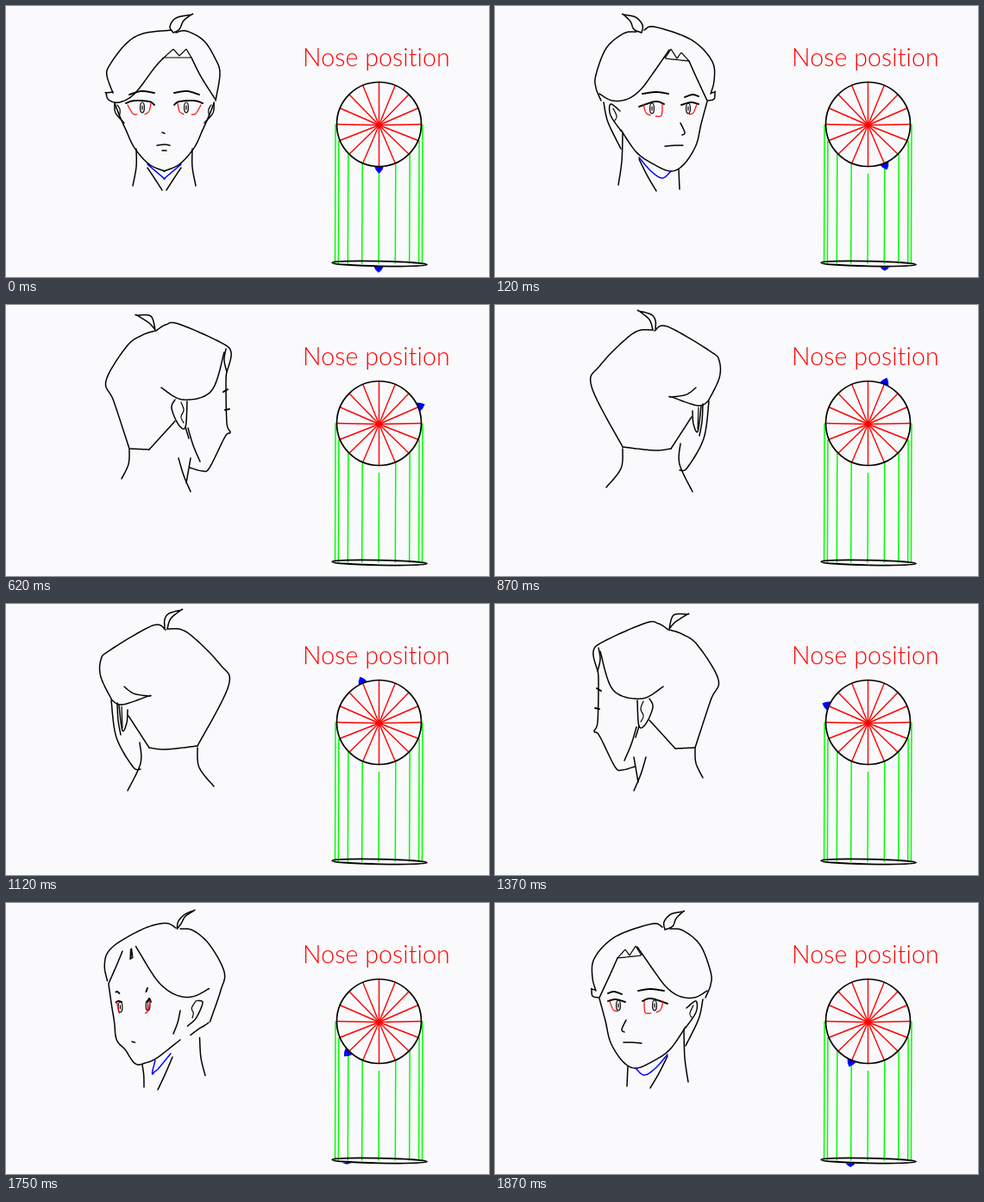
An HTML page with a canvas for the animation above (2000 ms loop, 560 px wide and 315 px high).

```html
<!DOCTYPE html>
<html lang="en">
<head>
<meta charset="utf-8">
<title>Nose position</title>
<style>
  html, body { margin: 0; overflow: hidden; background: #fafafc; }
  canvas { display: block; width: 560px; height: 315px; }
</style>
</head>
<body>
<canvas id="stage" width="560" height="315"></canvas>
<script>
const ctx = document.getElementById('stage').getContext('2d');
const STEPS = 16, SAMPLES = 49, TURN = 2 * Math.PI;

// Key points of each pen stroke; a repeated point makes a corner.
const frontHalf = {
  face: '126,113 131,126 139,144 149,165 166,184 184,192',
  ear: '126,112 127,124 137,136', earIn: '129,115 132,120 132,126',
  neck: '151,166 151,187 147,209', collar: '164,188 172,200 181,214',
  blueNeck: '164,184 184,201',
  brow: '143,103 157,99 172,101', lid: '139,113 149,110 166,111 172,115',
  iris: '158,118', redIn: '168,113 166,122 161,126', redOut: '141,115 147,125 152,126'
};
const frontHair = {
  tuft: '194,31 190,24 197,14 215,10 215,10 206,17 201,27 194,31',
  hairLeft: '192,28 159,32 139,44 120,69 117,81 124,101',
  hairRight: '197,31 209,29 229,40 242,60 248,78 243,110',
  bangLeft: '124,100 116,101 116,101 119,109 131,112 149,102 172,72 182,61',
  bangRight: '215,60 226,82 243,109',
  zig: '182,61 194,50 201,58 209,50 215,60 182,60',
  nose: '181,147 184,148', mouth: '175,162 184,161 190,162', lip: '181,168 186,168'
};
const quarter = {
  tuft: '197,31 196,22 204,13 218,10 218,10 210,18 206,27 197,31',
  hairFront: '194,28 183,24 148,35 128,48 114,67 113,87 117,102',
  curl: '116,101 112,100 112,100 113,108 120,110',
  hairBack: '203,30 218,32 238,49 250,80 250,95 244,110',
  bangFar: '142,64 134,82 121,110',
  zig: '142,64 151,54 156,61 163,50 170,61 142,64',
  bangNear: '165,51 183,77 198,97 213,108 231,110 246,102',
  ear: '222,122 233,114 233,127 221,145', earIn: '230,119 226,128 228,133',
  nape: '241,112 236,135 221,166', neckBack: '219,147 220,180 224,208',
  face: '121,111 128,137 134,162 148,184 163,192 183,184 203,170 221,144',
  neckFar: '154,190 153,213', neckNear: '200,178 190,198 180,215',
  blueNeck: '163,192 173,200 186,192 200,176',
  browFar: '131,105 138,103 147,106', browNear: '166,102 180,100 196,102',
  lidFar: '131,114 140,112 151,115', lidNear: '171,114 181,111 200,117',
  irisFar: '143,119', irisNear: '185,119',
  redFar: '133,114 137,124 142,126', redNear: '173,114 174,127 181,128', redIn: '195,114 192,124 187,127',
  nose: '152,136 147,147 150,150', mouth: '149,162 158,162 170,163'
};
const side = {
  tuft: '174,29 169,19 157,8 157,8 170,13 174,29',
  hairFront: '174,30 188,22 200,23 245,43 258,58 256,79',
  hairBack: '173,30 158,32 140,48 118,80 126,108 145,166',
  bangFar: '246,48 252,64 257,77',
  zig: '228,67 236,53 240,66 246,55 250,66 228,66',
  bangNear: '238,50 214,92 180,109 149,97',
  ear: '152,105 151,118 166,140 174,141', earIn: '163,108 170,118 166,125 170,134',
  sideburn: '172,125 175,139 180,152',
  nape: '145,166 167,141', neckBack: '144,166 142,180 136,193',
  face: '257,78 255,112 254,128 259,143 252,152 243,184 237,190 225,190 191,174',
  neckNear: '188,180 195,200 202,219', neckFar: '212,186 208,200 207,215',
  blueNeck: '191,174 205,197 209,195 209,195 192,174',
  browNear: '215,104 226,98 243,98', browFar: '250,102 258,104',
  lidNear: '217,117 223,111 238,113', lidFar: '250,117 257,115',
  irisNear: '230,119', irisFar: '252,123',
  redNear: '218,117 220,125 232,128', redIn: '235,114 234,125', redFar: '250,117 250,126 253,130',
  mouth: '231,160 238,161 245,161'
};
const away = {
  tuft: '173,29 166,21 152,12 152,12 168,13 173,29',
  hairFront: '174,30 185,23 200,22 248,43 261,55 256,78',
  hairBack: '173,30 158,35 140,48 116,88 125,112 143,167',
  bangFar: '255,51 253,64 256,78',
  bangNear: '253,55 238,100 205,110 180,96',
  ear: '196,110 192,120 200,139 208,142 210,112', earIn: '203,113 206,122 203,130 206,137',
  sideburn: '208,142 212,155', cheek: '211,143 217,163 225,182',
  napeLine: '143,167 166,168', nape: '166,168 196,135', neckBack: '143,168 142,185 134,202',
  face: '256,77 255,90 256,137 260,148 254,153 236,189 228,193 213,189',
  neckNear: '200,178 206,198 214,217', neckFar: '214,178 209,207',
  browFar: '252,101 257,98', lidFar: '254,122 259,121'
};
const rear = {
  tuft: '183,29 179,17 167,7 167,7 181,11 186,18 186,28',
  hairBack: '183,29 160,33 122,70 112,95 148,165',
  napeLine: '148,165 185,169 204,167', neckBack: '148,167 146,190 129,212',
  hairFront: '185,30 200,25 250,54 260,65 260,85 247,112',
  bangNear: '247,112 235,117 205,107 205,107 222,104 233,96',
  ear: '229,123 230,138 235,147 239,118', earIn: '236,119 235,144',
  cheek: '241,115 240,135 237,152', nape: '204,167 228,130',
  face: '248,112 242,155 223,189 214,192', neckNear: '215,161 214,185 229,217'
};

// Sample a spline evenly so strokes of two poses can be blended.
function sample(points, straight) {
  const p = points.split(' ').map(s => s.split(',').map(Number)), last = p.length - 1;
  if (!last) return p;
  return Array.from({ length: SAMPLES }, (_, i) => {
    const u = i / (SAMPLES - 1) * last, n = Math.min(last - 1, Math.floor(u)), t = u - n;
    const a = p[Math.max(0, n - 1)], b = p[n], c = p[n + 1], d = p[Math.min(last, n + 2)];
    return [0, 1].map(k => straight ? b[k] + (c[k] - b[k]) * t
      : b[k] + t / 2 * (c[k] - a[k] + t * (2*a[k] - 5*b[k] + 4*c[k] - d[k] + t * (3*(b[k] - c[k]) + d[k] - a[k]))));
  });
}

const mapStrokes = (pose, fn) =>
  Object.fromEntries(Object.entries(pose).map(([name, value]) => [name, fn(value, name)]));
const build = pose => mapStrokes(pose, (s, name) => sample(s, name.startsWith('zig')));
const mirror = (pose, sum) => mapStrokes(pose, s => s.map(([x, y]) => [sum - x, y]));
const blend = (a, b) => mapStrokes(a, (s, name) =>
  b[name] ? s.map(([x, y], i) => [(x + b[name][i][0]) / 2, (y + b[name][i][1]) / 2]) : s);

function symmetric(half, sum) {
  const both = { ...half };
  for (const [name, s] of Object.entries(mirror(half, sum))) both[name + 'Mirror'] = s;
  return both;
}

function makePoses() {
  const poses = [];
  poses[0] = { ...symmetric(build(frontHalf), 367), ...build(frontHair) };
  poses[15] = build(quarter);
  poses[1] = mirror(poses[15], 367);
  poses[3] = build(side);
  poses[13] = mirror(poses[3], 374);
  poses[5] = build(away);
  poses[11] = mirror(poses[5], 375);
  poses[7] = build(rear);
  poses[9] = mirror(poses[7], 370);
  const { tuft, hairBack, napeLine, neckBack } = poses[7];
  poses[8] = { tuft, ...symmetric({ hairBack, napeLine, neckBack }, 372) };
  for (const k of [2, 4, 6, 10, 12, 14]) poses[k] = blend(poses[k - 1], poses[k + 1]);
  return poses;
}
const poses = makePoses();

function stroke(color, width, trace) {
  ctx.strokeStyle = color;
  ctx.lineWidth = width;
  ctx.beginPath();
  trace();
  ctx.stroke();
}

function drawHead(pose) {
  for (const [name, points] of Object.entries(pose)) {
    const color = name.startsWith('red') ? '#f00' : name.startsWith('blue') ? '#00f' : '#000';
    const width = /^(lid|brow)/.test(name) ? 1.9 : /^(red|zig|earIn|iris)/.test(name) ? 1.2 : 1.5;
    stroke(color, width, () => {
      if (name.startsWith('iris')) {
        const [x, y] = points[0];
        ctx.ellipse(x, y, 2.4, 6, 0, 0, TURN);
        ctx.moveTo(x, y - 2);
        ctx.lineTo(x, y + 2);
      } else points.forEach(([x, y]) => ctx.lineTo(x, y));
    });
  }
}

function marker(x, y, angle, height) {
  ctx.save();
  ctx.translate(x, y);
  ctx.rotate(angle);
  ctx.fillStyle = '#00f';
  ctx.beginPath();
  ctx.moveTo(-5.5, 0);
  ctx.quadraticCurveTo(-4, height * 0.6, 0, height);
  ctx.quadraticCurveTo(4, height * 0.6, 5.5, 0);
  ctx.fill();
  ctx.restore();
}

function drawDial(step) {
  const cx = 432.5, cy = 137.5, r = 49;
  ctx.fillStyle = '#f00';
  ctx.font = '300 28.5px Lato, sans-serif';
  ctx.letterSpacing = '0.1px';
  ctx.fillText('Nose position', 344, 70);

  for (let i = 0; i < STEPS; i++) {
    const a = i / STEPS * TURN, c = Math.cos(a), s = Math.sin(a);
    stroke('#f00', 1.4, () => {
      ctx.moveTo(cx, cy + 1);
      ctx.lineTo(cx + r * s, cy + r * c);
    });
    // Front spokes drop a line to the edge-on ring below.
    if (c > -0.01) stroke('#0f0', 1.5, () => {
      ctx.moveTo(cx + 1.03 * r * s, cy + r * c + (i ? 0.5 : 9));
      ctx.lineTo(cx + 1.03 * r * s - 0.5, 299);
    });
  }

  const turn = step / STEPS * TURN, c = Math.cos(turn), s = Math.sin(turn);
  marker(cx + r * s, cy + r * c, -turn, 8.5);
  if (c > -0.01) marker(432 + 52 * s, 301.5 + 1.5 * c + s, 0, 1.5 + 5.5 * c ** 8);
  stroke('#000', 1.7, () => ctx.arc(cx, cy, r, 0, TURN));
  stroke('#000', 1.7, () => ctx.ellipse(433, 299.5, 55, 2.8, 0.02, 0, TURN));
}

function frame(now) {
  const t = Math.floor(now % 2000 / 10) * 10;
  const step = Math.floor((t + 9) / 125);
  ctx.fillStyle = '#fafafc';
  ctx.fillRect(0, 0, 560, 315);
  ctx.lineCap = ctx.lineJoin = 'round';
  drawHead(poses[step]);
  drawDial(step);
  requestAnimationFrame(frame);
}
requestAnimationFrame(frame);
</script>
</body>
</html>
```
